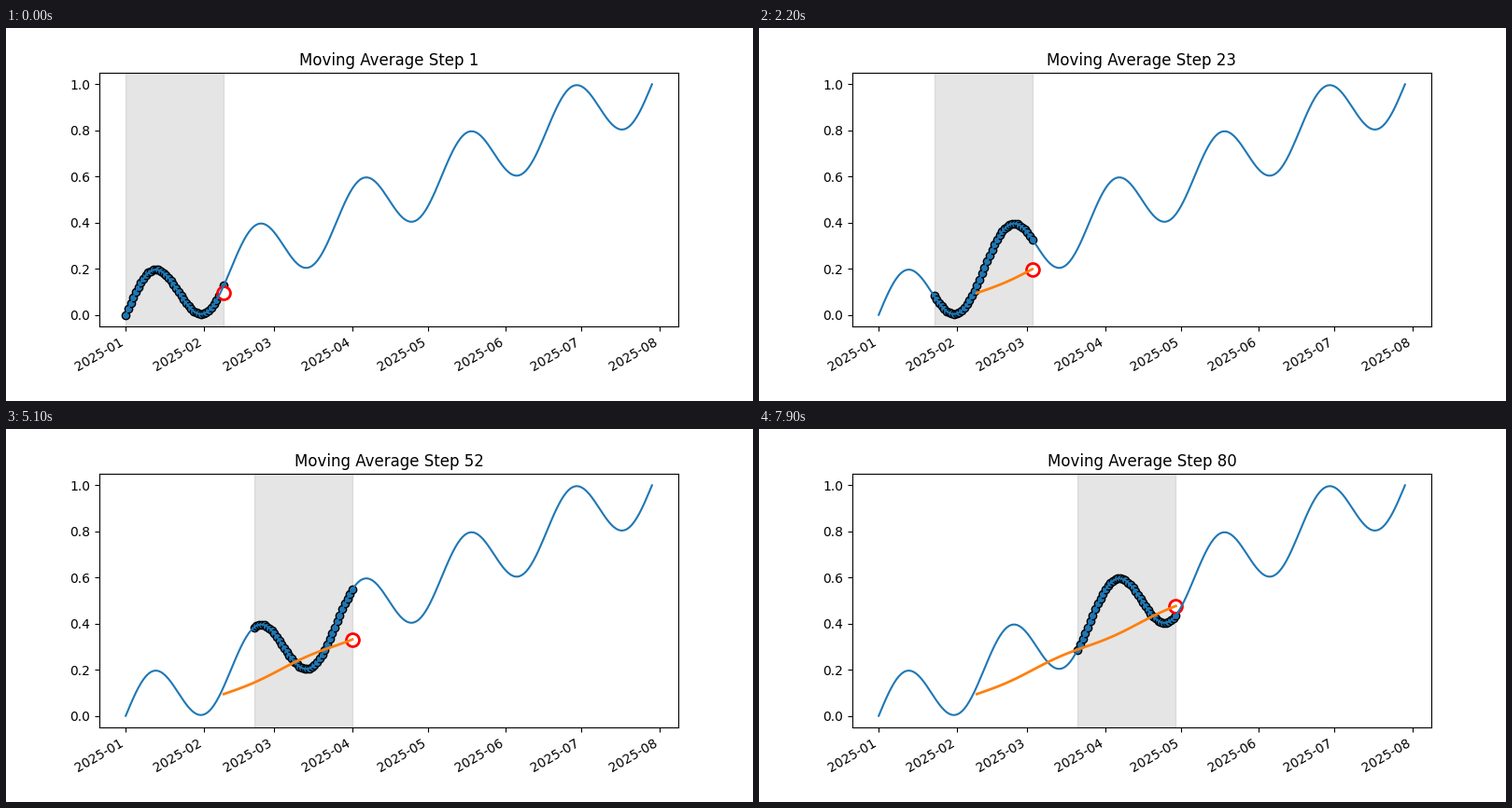
A matplotlib script that plays this animation: 800x400 px, repeating every 8000 ms.

```python
import numpy as np
import matplotlib.pyplot as plt
from matplotlib.animation import FuncAnimation
from matplotlib.dates import date2num

DAYS = 210
WINDOW = 40
STEPS = 80

# Rising trend with five sine waves, scaled to 0..1
t = np.linspace(0, 1, DAYS)
values = t + np.sin(10 * np.pi * t) / 7
dates = date2num(np.datetime64("2025-01-01")) + np.arange(DAYS)

average = np.convolve(values, np.ones(WINDOW) / WINDOW, mode="valid")
average_dates = dates[WINDOW - 1:]

fig, ax = plt.subplots(figsize=(8, 4), dpi=100)
ax.xaxis_date()
ax.plot(dates, values)
ax.set_xlim(ax.get_xlim())
ax.set_ylim(ax.get_ylim())
fig.autofmt_xdate()

span = ax.axvspan(dates[0], dates[WINDOW - 1], color="gray", alpha=0.2)
dots = ax.scatter(dates[:WINDOW], values[:WINDOW], color="C0", edgecolor="black")
trail, = ax.plot([], [], color="C1", linewidth=2)
ring = ax.scatter(average_dates[:1], average[:1], s=100,
                  facecolor="white", edgecolor="red", linewidth=2)
title = ax.set_title("Moving Average Step 1")


def update(i):
    part = slice(i, i + WINDOW)
    span.set_x(dates[i])
    dots.set_offsets(np.column_stack([dates[part], values[part]]))
    trail.set_data(average_dates[:i + 1], average[:i + 1])
    ring.set_offsets([[average_dates[i], average[i]]])
    title.set_text(f"Moving Average Step {i + 1}")
    return span, dots, trail, ring, title


anim = FuncAnimation(fig, update, frames=STEPS, interval=100,
                     repeat=True, repeat_delay=0)
plt.show()
```
